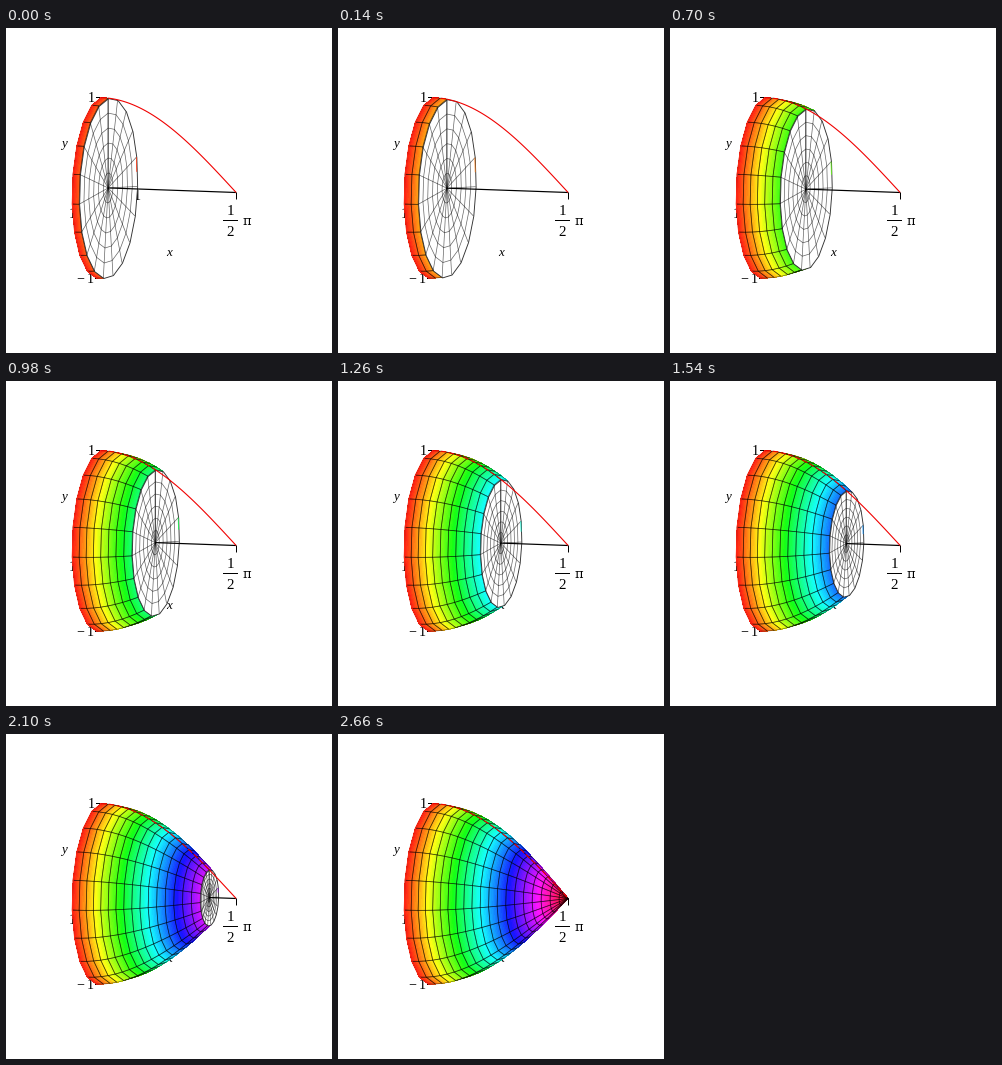
Recreate the animation shown at these times as a matplotlib script. Size 326 px wide and 325 px high, loop 2800 ms.

```python
import colorsys
import math

import numpy as np
import matplotlib.pyplot as plt
from matplotlib.animation import FuncAnimation
from matplotlib.collections import LineCollection, PolyCollection

W, H, DPI = 326, 325, 64
PX = 72 / DPI              # one pixel in points
STEPS = 20                 # strips along the x axis, one per frame
SIDES = 19                 # facets around the axis
RINGS = 6                  # rings on the end cap
SHADES = 6                 # colour steps inside one strip
END = math.pi / 2

# Orthographic view: yaw about the vertical, then a slight tilt
SCALE, YAW, TILT = 90.6, math.radians(18.8), math.radians(6)
ORIGIN = np.array([95.4, 159.7])
AX = SCALE * np.array([math.cos(YAW), math.sin(YAW) * math.sin(TILT)])
AY = SCALE * np.array([0, -math.cos(TILT)])
AZ = SCALE * np.array([-math.sin(YAW), math.cos(YAW) * math.sin(TILT)])

THETA = np.linspace(0, 2 * math.pi, SIDES + 1)


def project(x, y, z):
    x, y, z = np.broadcast_arrays(x, y, z)
    return ORIGIN + x[..., None] * AX + y[..., None] * AY + z[..., None] * AZ


def ring(x, r):
    return project(x, r * np.cos(THETA), r * np.sin(THETA))


def signed_area(p):
    q = np.roll(p, -1, axis=0)
    return np.sum(p[:, 0] * q[:, 1] - p[:, 1] * q[:, 0]) / 2


def hue(u):
    return colorsys.hsv_to_rgb(u, 0.92, 1)


def strip(j):
    """Front-facing facets of strip j, plus the slices that shade them."""
    x0, x1 = j * END / STEPS, (j + 1) * END / STEPS
    a, b = ring(x0, math.cos(x0)), ring(x1, math.cos(x1))
    facets, slices, colors = [], [], []
    for n in range(SIDES):
        facet = np.array([a[n], b[n], b[n + 1], a[n + 1]])
        if signed_area(facet) <= 0.05:
            continue
        facets.append(facet)
        for s in range(SHADES):
            u, v = s / SHADES, (s + 1) / SHADES
            top, low = b[n] - a[n], b[n + 1] - a[n + 1]
            slices.append(np.array([a[n] + u * top, a[n] + v * top,
                                    a[n + 1] + v * low, a[n + 1] + u * low]))
            colors.append(hue((j + (u + v) / 2) / STEPS))
    return facets, slices, colors


STRIPS = [strip(j) for j in range(STEPS)]

fig = plt.figure(figsize=(W / DPI, H / DPI), dpi=DPI, facecolor="white")
ax = fig.add_axes([0, 0, 1, 1])
ax.set_xlim(0, W)
ax.set_ylim(H, 0)
ax.axis("off")


def label(x, y, text, size=14, family="Liberation Serif", **kw):
    ax.text(x, y, text, fontsize=size * PX, family=family,
            ha="center", va="center_baseline", zorder=1, **kw)


def line(xs, ys, color="black", width=1.0, z=1, **kw):
    return ax.plot(xs, ys, color=color, lw=width * PX, zorder=z,
                   solid_capstyle="butt", snap=False, **kw)[0]


# Labels and ticks
label(85, 69.2, "1")
label(74.3, 249.7, "−")
label(84, 249.7, "1")
label(66, 184.5, "1")
label(123, 167, "−")
label(131.5, 167, "1")
label(58, 114.3, "y", 13, style="italic")
label(163, 223.5, "x", 13, style="italic")
label(224, 181.7, "1", 15)
label(224, 202.7, "2", 15)
label(241, 191.7, "π", 13, "DejaVu Serif")
line([217, 232], [192.5, 192.5])
line([90, 98], [69.5, 69.5])
line([89, 97], [250.5, 250.5])
line([66.5, 66.5], [169, 176])
tip = project(END, 0, 0)
line([230.5, 230.5], [tip[1], tip[1] + 7])

# Moving parts
skin = ax.add_collection(PolyCollection(
    [], edgecolors="none", antialiaseds=False, zorder=2))
mesh = ax.add_collection(PolyCollection(
    [], facecolors="none", edgecolors=(0, 0, 0, 0.5),
    linewidths=0.75 * PX, zorder=2.5))
cap = ax.add_collection(PolyCollection(
    [], facecolors="white", edgecolors="#303030", linewidths=0.9 * PX, zorder=4))
web = ax.add_collection(LineCollection(
    [], colors=(0, 0, 0, 0.6), linewidths=0.7 * PX, zorder=5))
seam = line([], [], "#202020", z=6)
glint = line([], [], width=0.8, z=6)
axis = line([], [], width=1.2, z=7)

rim_angle = THETA[:SIDES // 2 + 1]
rim = project(0, np.cos(rim_angle), np.sin(rim_angle))
line(rim[:, 0], rim[:, 1], "#ff2a14", 1.1, 3)

RED = "#f00000"
inner = line([], [], RED, 1.1, 8, dashes=(5, 2), dash_capstyle="butt")
outer = line([], [], RED, 1.1, 8)


def set_curve(artist, x0, x1):
    x = np.linspace(x0, x1, 60)
    p = project(x, np.cos(x), 0)
    artist.set_data(p[:, 0], p[:, 1])


def set_segment(artist, p, q):
    artist.set_data([p[0], q[0]], [p[1], q[1]])


def draw(i):
    count = i + 1
    x = count * END / STEPS
    r = math.cos(x)
    facets, slices, colors = [], [], []
    for f, s, c in STRIPS[:count]:
        facets += f
        slices += s
        colors += c
    skin.set_verts(slices)
    skin.set_facecolor(colors)
    mesh.set_verts(facets)

    center = project(x, 0, 0)
    edge = ring(x, r)
    rings = [ring(x, r * m / RINGS) for m in range(1, RINGS)]
    spokes = [np.array([center, p]) for p in edge[1:-1]]
    cap.set_verts([edge])
    web.set_segments(rings + spokes)
    set_segment(seam, center, edge[0])
    # sliver of the far side showing at the right rim
    set_segment(glint, (edge[14] + edge[15]) / 2, edge[15])
    glint.set_color(hue((count - 0.5) / STEPS))
    set_segment(axis, center, tip)
    for part in (cap, web, seam, glint, axis):
        part.set_visible(count < STEPS)
    set_curve(inner, 0, x)
    set_curve(outer, x, END)
    return skin, mesh, cap, web, seam, glint, axis, inner, outer


anim = FuncAnimation(fig, draw, frames=STEPS, interval=140,
                     init_func=lambda: draw(0), repeat=True, repeat_delay=0)
plt.show()
```
